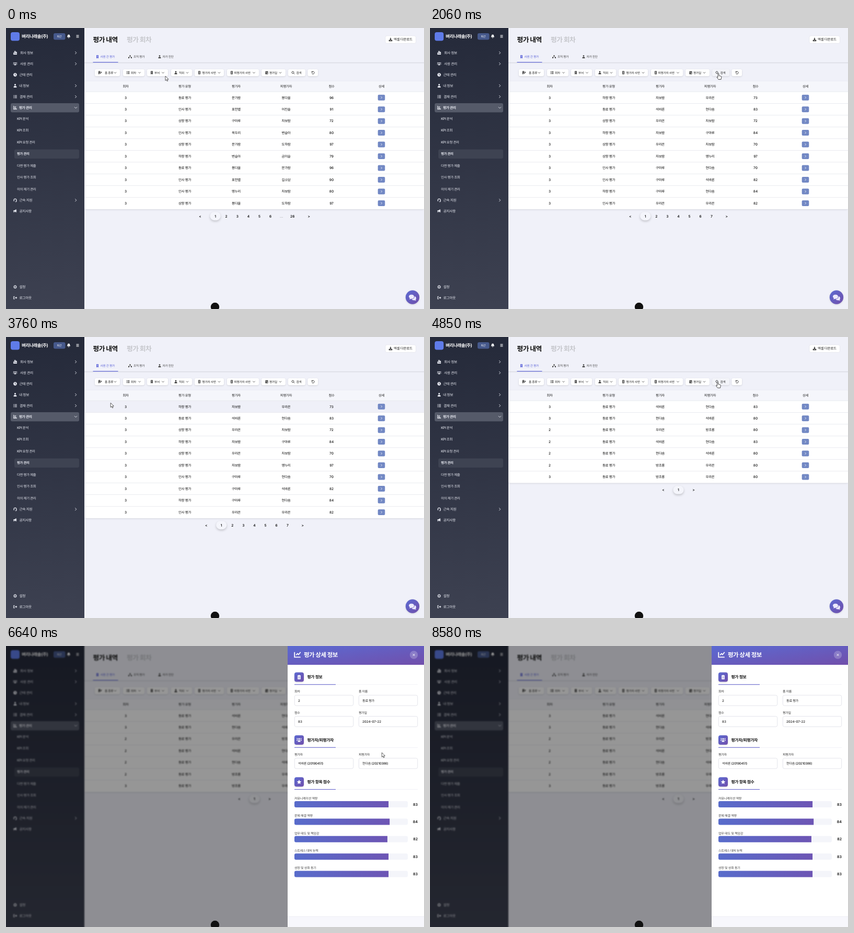
Write an HTML page that moves like this. It is 800 by 538 pixels and loops after 8.61 s.

```html
<!DOCTYPE html>
<html lang="ko">
<head>
<meta charset="utf-8">
<title>평가 내역</title>
<style>
html, body { margin: 0; width: 100%; height: 100%; overflow: hidden; background: #f0f1f9; }
svg { display: block; }
text { font-family: Inter, 'Noto Sans CJK KR', 'Noto Sans CJK', sans-serif; text-rendering: geometricPrecision; white-space: pre; }
.ko { letter-spacing: -.045em; }
.soft { filter: drop-shadow(0 1px 1.5px #0002); }
</style>
</head>
<body>
<svg id="stage" width="800" height="538" viewBox="0 0 800 538"></svg>
<script>
const LOOP = 8610;
const stage = document.getElementById('stage');

// Icons live in a 12-unit box around the origin; LINE lists the stroked ones.
const ICON = {
  building: 'M-4-6h8v12h-3v-3h-2v3h-3zM-2-4v2h1.5v-2zM.5-4v2h1.5v-2zM-2-1v2h1.5v-2zM.5-1v2h1.5v-2z',
  city: 'M-6-1h3v-5h5v3h4v9h-12zM-1.5-4v2h2v-2zM-4 1v2h2v-2zM-.5 1v2h2v-2zM3 1v2h1.5v-2z',
  user: 'M0-6a2.8 2.8 0 1 1-.01 0zM-5 6v-2q0-3 3-3h4q3 0 3 3v2z',
  users: 'M0-5a2.2 2.2 0 1 1-.01 0zM-3.5 5v-1.5q0-3 3.5-3t3.5 3v1.5zM-5-5a1.5 1.5 0 1 1-.01 0zM5-5a1.5 1.5 0 1 1-.01 0zM-7 2q0-3 3-3l1 .5q-2 1-2 2.5zM7 2q0-3-3-3l-1 .5q2 1 2 2.5z',
  clock: 'M0-6a6 6 0 1 1-.01 0zM-.7-4v4.5l3 2 .8-1.2-2.4-1.5v-3.8z',
  list: 'M-6-5h2.5v2h-2.5zM-2-5h8v1.8h-8zM-6-1h2.5v2h-2.5zM-2-1h8v1.8h-8zM-6 3h2.5v2h-2.5zM-2 3h8v1.8h-8z',
  chart: 'M-6-6h2v10h10v2h-12zM-2.5-4h6v1.7h-6zM-2.5-1.2h4v1.7h-4zM-2.5 1.5h7v1.5h-7z',
  headset: 'M-4.5 3v-3a4.5 4.5 0 0 1 9 0v3q0 2.500-4 2.500M-3.500 0v3M3.500 0v3',
  horn: 'M-6-2h3l7-4v11l-7-4v4h-2v-4h-1zM5-2q2 1.500 0 3z',
  gear: 'M0-3.400a3.400 3.400 0 1 1-.01 0zM0-6v2M0 4v2M-6 0h2M4 0h2M-4.200-4.200l1.400 1.400M2.800 2.800l1.400 1.400M4.200-4.200l-1.400 1.400M-2.800 2.800l-1.400 1.400',
  logout: 'M-1-4h-4v8h4M-2 0h7M2.500-3l3 3-3 3',
  bell: 'M0-6q4 0 4 5l1.500 3.500h-11l1.500-3.500q0-5 4-5zM-1.600 4h3.200q0 2-1.600 2t-1.600-2z',
  bars: 'M-5-4h10M-5 0h10M-5 4h10',
  download: 'M-1.200-6h2.400v5h3l-4.200 4-4.200-4h3zM-6 2h2.500l3.500 2.500 3.500-2.500h2.500v4h-12z',
  org: 'M-2-6h4v4h-1.200v2h5v2h1.200v4h-4v-4h1v-.8h-8v.8h1v4h-4v-4h1.200v-2h5v-2h-1.200z',
  edit: 'M-6-6h7v4l-4 5v3h-3zM-4-4v1.200h3v-1.200zM5-4l2 2-5.500 6-2.500.6.5-2.500z',
  badge: 'M-4-6h8v12h-8zM0-4a1.700 1.700 0 1 1-.01 0zM-2.500 3.500q0-3 2.500-3t2.500 3z',
  date: 'M-5-5h2v-1h1.500v1h3v-1h1.500v1h2v11h-10zM-3.500-2v1.200h7v-1.200zM0 1v3h3v-3z',
  search: 'M-1-5a4 4 0 1 1-.01 0zM2 2l3.500 3.500',
  undo: 'M-4.500-5v3.500h3.500M-4.500-2a5 5 0 1 1 0 4',
  right: 'M-2.500-5l5 5-5 5',
  down: 'M-5-2.500l5 5 5-5',
  trend: 'M-6-5v10h12M-3 1l3-3 2 2 4-5',
  clip: 'M-4-5h2.500q1.500-2 3 0h2.500v11h-8zM-2-1.500v1.200h4v-1.200zM-2 1.500v1.200h4v-1.200z',
  star: 'M0-6l1.800 3.800 4.200.6-3 3 .7 4.200-3.700-2-3.700 2 .7-4.200-3-3 4.200-.6z',
  chat: 'M-2-5q5 0 5 4t-5 4l-4 1 1-2.500q-2-1-2-2.500 0-4 5-4zM4-2q3 1 3 4 0 1.500-1 2.500l.8 2-3.300-.8q-4 0-5-2 5.500-.5 5.500-5.700z',
  close: 'M-4-4l8 8M4-4l-8 8'
};
const LINE = 'headset gear logout bars search undo right down trend close'.split(' ');

const rect = (x, y, w, h, fill, r = 0, more = '') =>
  `<rect x="${x}" y="${y}" width="${w}" height="${h}" rx="${r}" fill="${fill}" ${more}/>`;
const text = (x, y, s, size, fill = '#111', weight = 500, anchor = 'start') =>
  `<text x="${x}" y="${y + size * .36}" font-size="${size}" fill="${fill}" font-weight="${weight}" text-anchor="${anchor}"` +
  `${/[가-힣]/.test(s) ? ' class="ko"' : ''}>${s.replace('<', '&lt;')}</text>`;
const mid = (x, y, s, size, fill, weight) => text(x, y, s, size, fill, weight, 'middle');
const icon = (name, x, y, size, fill) =>
  `<path d="${ICON[name]}" transform="translate(${x} ${y}) scale(${size / 12})" ` +
  (LINE.includes(name) ? `fill="none" stroke="${fill}" stroke-width="1.9"/>` : `fill="${fill}" fill-rule="evenodd"/>`);
const gradient = (id, x2, y2, a, b) =>
  `<linearGradient id="${id}" x2="${x2}" y2="${y2}"><stop stop-color="${a}"/><stop offset="1" stop-color="${b}"/></linearGradient>`;

// Sidebar
function sidebar() {
  const ink = '#e6e8f0';
  const items = [
    ['city', '회사 정보', 47.5, 27, 'right'], ['users', '사원 관리', 68.5, 27, 'right'],
    ['clock', '근태 관리', 89.5, 25.5], ['user', '내 정보', 110.5, 25, 'right'],
    ['list', '결재 관리', 131.5, 26, 'right'], ['chart', '평가 관리', 152.5, 25, 'down'],
    ['headset', '근속 지원', 329.7, 25.5, 'right'], ['horn', '공지사항', 350.5, 25.5],
    ['gear', '설정', 495.7, 25.5], ['logout', '로그아웃', 516.5, 25.5]
  ];
  const subs = ['KPI 분석', 'KPI 조회', 'KPI 요청 관리', '평가 관리', '다면 평가 제출', '인사 평가 조회', '이의 제기 관리'];
  return rect(-20, -20, 170, 578, 'url(#night)') +
    rect(9, 8, 17, 16.5, '#5f7be8', 4) + text(30, 16, '벼리나래솔(주)', 8.5, '#fff', 700) +
    rect(91, 10, 22.5, 12.5, '#46598c', 3) + mid(102, 16, '퇴근', 5.2, '#fff') +
    icon('bell', 120, 16, 7, '#fff') + icon('bars', 137, 16, 6, '#fff') +
    rect(9, 144, 131, 17.5, '#555a69', 3) + rect(16, 232.5, 124, 17.5, '#3e4352', 3) +
    items.map(([name, label, y, x, arrow]) =>
      icon(name, 17.5, y, 6.8, ink) + text(x, y, label, 6.7, ink, arrow === 'down' ? 700 : 500) +
      (arrow ? icon(arrow, 133.5, y, 6, ink) : '')).join('') +
    subs.map((s, i) => text(21, 173.5 + 22.5 * i, s, 6.4, ink, i === 3 ? 700 : 500)).join('');
}

// Filter buttons: left, right, icon, icon x, label, label x, chevron x
const filters = [
  [170, 218, 'edit', 180, '폼 종류', 189, 209], [224, 265, 'list', 233.5, '회차', 239, 255.5],
  [270, 310, 'building', 279, '부서', 284, 300.5], [316, 356, 'user', 325, '직위', 331, 347],
  [361, 417, 'badge', 370, '평가자 사번', 375.5, 408], [423, 484, 'badge', 432, '피평가자 사번', 436.5, 474.5],
  [489, 535, 'date', 499, '평가일', 504, 525], [540, 573, 'search', 549.5, '검색', 555.5], [577.5, 597, 'undo', 587.5]
];

function header() {
  const tabs = [['building', 175, '사원 간 평가', 180.5, '#5a62d8'], ['org', 237.5, '조직 평가', 244, '#444'], ['user', 294, '자가 진단', 299.5, '#444']];
  return rect(150, -20, 690, 578, '#f0f1f9') +
    text(166.5, 22, '평가 내역', 12.8, '#111', 700) + text(231, 22, '평가 회차', 12.8, '#c6c7cc', 700) +
    rect(726, 15, 58.5, 14.5, '#fff', 3, 'stroke="#dfe0e8" stroke-width=".6"') +
    icon('download', 736, 22, 6.5, '#222') + text(742, 22, '엑셀 다운로드', 6.5, '#222') +
    rect(150, 65.8, 690, 1.6, '#dbdce4') + rect(166.5, 65, 48, 1.1, '#5a62d8') +
    tabs.map(([n, ix, s, x, c]) => icon(n, ix, 55, 6, c) + text(x, 55, s, 5.7, c)).join('') +
    filters.map(([l, r, n, ix, s, x, arrow]) =>
      rect(l, 79, r - l, 13.3, '#fff', 3, 'class="soft filter"') + icon(n, ix, 85.6, 6, '#333') +
      (s ? text(x, 85.6, s, 5.7, '#222') : '') + (arrow ? icon('down', arrow, 85.6, 5, '#333') : '')).join('');
}

// Table. Row code: round, type, reviewer, reviewee, score
const people = '문가람 봉다울 표한별 어진솔 구마루 차보람 옥두리 변슬아 도하람 금이슬 길소담 맹누리 우라온 석바론 현다솜 방초롱'.split(' ');
const kinds = ['동료 평가', '인사 평가', '상향 평가', '하향 평가'];
const TOP = 122, ROW = 22.47, COLS = [229, 342, 440.5, 536, 623];
const views = [
  ['300196 312391 324572 316780 320897 337979 301096 312a90 31b580 321897', '1 2 3 4 5 6 … 26'],
  ['335c73 30de83 32c572 335484 32c570 325b97 314e70 314d82 334e84 31cc82', '1 2 3 4 5 6 7'],
  ['30de83 30ed80 20cf80 20de83 20ed80 20fc80 30fc80', '1']
];

function table([codes, pages]) {
  const rows = codes.split(' '), bottom = TOP + ROW * rows.length;
  let out = rect(150.5, 102, 649.5, bottom - 102, '#fff', 3, 'class="soft"') +
    `<path d="M150.500 122v-17q0-3 3-3h643.500q3 0 3 3v17z" fill="#f5f6fb"/>`;
  ['회차', '평가 유형', '평가자', '피평가자', '점수', '상세'].forEach((s, i) => out += mid(COLS[i] || 718.5, 112, s, 6.4, '#222'));
  rows.forEach((code, i) => {
    const y = TOP + ROW * i, c = y + 11.2;
    const name = k => people[parseInt(code[k], 16)];
    const cells = [code[0], kinds[code[1]], name(2), name(3), code.slice(4)];
    out += rect(150.5, y, 649.5, ROW, '#fff', 0, 'class="row"') + rect(150.5, y - .4, 649.5, .8, '#e4e5eb') +
      cells.map((s, k) => mid(COLS[k], c, s, 6.5, '#111')).join('') +
      rect(711.7, c - 5.5, 13.6, 11, '#7288c4', 2, 'class="more"') + icon('right', 718.5, c, 5, '#fff');
  });
  const labels = pages.split(' '), n = labels.length, y = bottom + 13.5;
  const wide = n > 7, first = 475.5 - (n - 1) * 10.55 - (wide ? 1.1 : 0), last = first + (n - 1) * 21.1;
  out += rect(first - 10, y - 8, 20, 16, '#f4f5fb', 8, 'style="filter:drop-shadow(0 2px 2px #0003)"') +
    mid(first - 29, y, '<', 6.6, '#111', 600) + mid(last + (wide ? 31.5 : 29), y, '>', 6.6, '#111', 600) +
    labels.map((s, i) => mid(first + 21.1 * i, y, s, 6.6, s === '…' ? '#999' : '#111', 600)).join('');
  return `<g class="view">${out}</g>`;
}

// Detail panel
function panel() {
  const section = (y, name, s) => rect(552, y - 9, 18, 18, 'url(#violet)', 4, 'class="soft"') + icon(name, 561, y, 8.5, '#fff') +
    text(576.5, y, s, 7.8, '#111', 700) + rect(552, y + 14, 236, .6, '#e9e9f2') + rect(552, y + 13.7, 79, 1.1, '#6766cc');
  const field = (x, y, label, value) => text(x, y, label, 6, '#333') +
    rect(x + .3, y + 7, 112.4, 20, '#fff', 3, 'stroke="#d9dae2" stroke-width=".7"') + text(x + 7, y + 17.2, value, 6.2, '#222');
  const scores = [['커뮤니케이션 역량', 83], ['문제 해결 역량', 84], ['업무 태도 및 책임감', 82], ['스트레스 대처 능력', 83], ['성장 및 성취 동기', 83]];
  return rect(539, 0, 261, 538, '#fff') + rect(539, 0, 261, 36, 'url(#violet)') +
    icon('trend', 558, 16.5, 11.5, '#fff') + text(570, 17, '평가 상세 정보', 11.5, '#fff', 700) +
    '<circle cx="780.5" cy="17" r="7.7" fill="#fff" fill-opacity=".22"/>' + icon('close', 780.5, 17, 6, '#fff') +
    section(59.5, 'clip', '평가 정보') + field(552, 87.2, '회차', '2') + field(675, 87.2, '폼 이름', '동료 평가') +
    field(552, 127.6, '점수', '83') + field(675, 127.6, '평가일', '2024-07-22') +
    section(180, 'users', '평가자/피평가자') +
    field(552, 207.8, '평가자', people[13] + ' (20190451)') + field(675, 207.8, '피평가자', people[14] + ' (20210386)') +
    section(260.3, 'star', '평가 항목 점수') +
    scores.map(([s, v], i) => {
      const y = 303 + 33.4 * i;
      return text(552, y - 11.4, s, 6.1, '#444', 400) + rect(552, y - 6, 217, 12, '#f4f5fa', 3) +
        `<path d="M${552 + 2.17 * v} ${y - 6}v12H555q-3 0-3-3v-6q0-3 3-3z" fill="url(#bar)"/>` +
        text(788, y, String(v), 7, '#111', 600, 'end');
    }).join('') +
    rect(539, 518, 261, 20, '#f7f7fc') + rect(539, 517.6, 261, .7, '#e8e8f0');
}

const pointers = {
  arrow: '<path d="M0 0v8.600l2-1.800 1.300 3 1.500-.6-1.300-3h2.600z" fill="#fff" stroke="#333" stroke-width=".8"/>',
  hand: '<path d="M-1 .5q1-1.700 2 0v4l4 .8q1 .4.8 1.800l-.8 4.400h-5l-3-4q0-1.200 1.200-.6l.8.7z" fill="#fff" stroke="#222" stroke-width=".8"/>',
  beam: '<path d="M-2.500-4q2.500 0 2.500 1.200 0-1.200 2.500-1.200M0-3v6.500M-2.500 4.500q2.500 0 2.500-1.200 0 1.200 2.500 1.200" fill="none" stroke="#222" stroke-width=".9"/>'
};

stage.innerHTML = '<defs>' + gradient('night', 0, 1, '#242939', '#3e4252') + gradient('violet', 1, 1, '#5b6ad2', '#714fab') +
  gradient('bar', 1, 0, '#586ccb', '#6d55b4') + '</defs>' +
  '<g id="page">' + header() + views.map(table).join('') + sidebar() +
  '<circle class="soft" cx="778" cy="515.500" r="13.200" fill="url(#violet)"/>' + icon('chat', 778, 515.5, 12, '#eceafc') + '</g>' +
  rect(0, 0, 800, 538, '#000', 0, 'id="shade"') + '<g id="panel">' + panel() + '</g>' +
  '<circle cx="400" cy="534" r="8.200" fill="#111"/>' +
  '<g id="pointer">' + Object.entries(pointers).map(([k, p]) => `<g class="${k}">${p}</g>`).join('') + '</g>';

const $ = s => stage.querySelector(s), $$ = s => [...stage.querySelectorAll(s)];
const page = $('#page'), shade = $('#shade'), drawer = $('#panel'), pointer = $('#pointer');
const filterBoxes = $$('.filter');
const viewParts = $$('.view').map(g => ({ g, rows: [...g.querySelectorAll('.row')], more: [...g.querySelectorAll('.more')] }));

// Pointer stops: time, x, y
const path = [
  [0, 305, 92], [300, 291, 86], [600, 291, 86], [900, 296, 126], [1100, 300, 128], [1330, 366, 127], [1750, 552, 87], [2150, 552, 87],
  [2700, 281, 98], [3000, 200, 87], [3400, 200, 87], [3700, 200, 126], [4000, 202, 126], [4600, 550.5, 86], [5050, 550.5, 86],
  [6050, 719.3, 204], [7100, 719.3, 204], [7500, 640, 300], [8030, 706, 392], [8520, 802, 540], [LOOP, 802, 540]
];

function pointerAt(t) {
  const i = Math.max(1, path.findIndex(p => p[0] > t));
  const [t0, x0, y0] = path[i - 1], [t1, x1, y1] = path[i];
  const u = (t - t0) / (t1 - t0), e = u * u * (3 - 2 * u);
  return [x0 + (x1 - x0) * e, y0 + (y1 - y0) * e];
}

function draw(t) {
  const [x, y] = pointerAt(t);
  const open = 1 - (1 - Math.min(1, Math.max(0, (t - 6280) / 320))) ** 3;
  const free = open === 0;
  const view = t < 2000 ? 0 : t < 4700 ? 1 : 2;
  const over = free && y > 79 && y < 91 ? filters.findIndex(f => x > f[0] && x < f[1]) : -1;
  const row = y >= TOP ? Math.floor((y - TOP) / ROW) : -1;

  filterBoxes.forEach((b, i) => b.setAttribute('fill', i === over ? '#f3f4f9' : '#fff'));
  viewParts.forEach(({ g, rows, more }, v) => {
    g.style.display = v === view ? '' : 'none';
    rows.forEach((r, i) => {
      const hit = i === row && free && x > 150;
      r.setAttribute('fill', hit ? '#eff0f8' : '#fff');
      more[i].setAttribute('fill', hit && x > 711 && x < 726 ? '#56628c' : '#7288c4');
    });
  });

  page.style.filter = free ? '' : `blur(${1.3 * open}px)`;
  shade.setAttribute('fill-opacity', .41 * open);
  drawer.style.display = free ? 'none' : '';
  drawer.setAttribute('transform', `translate(${261 * (1 - open)} 0)`);

  const kind = over >= 0 ? 'hand' : free && row >= 0 && Math.abs(x - 342) < 27 ? 'beam' : 'arrow';
  for (const g of pointer.children) g.style.display = g.classList.contains(kind) ? '' : 'none';
  pointer.setAttribute('transform', `translate(${x} ${y})`);
}

function tick() {
  draw(performance.now() % LOOP);
  requestAnimationFrame(tick);
}
tick();
</script>
</body>
</html>
```
